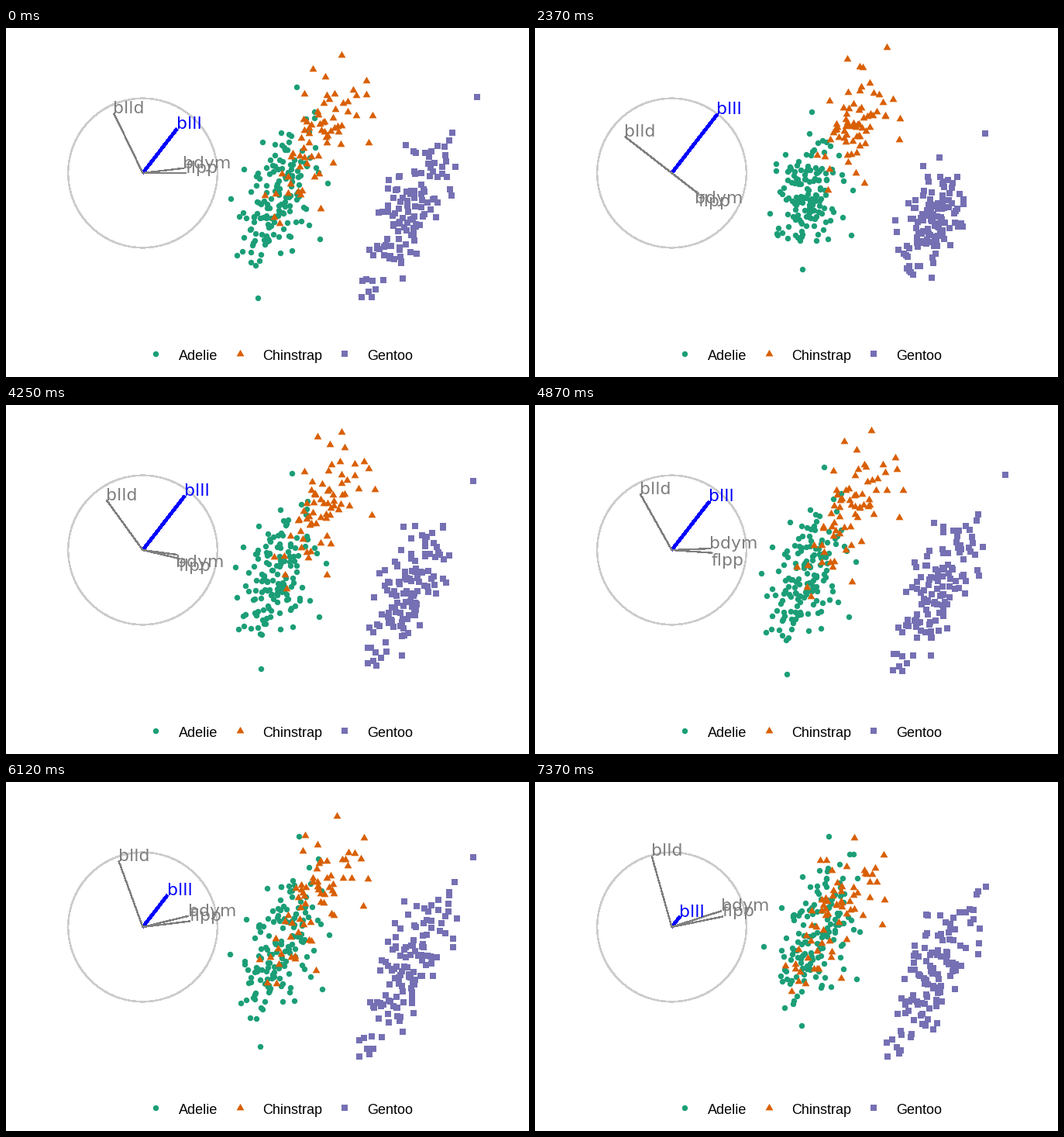
Write a matplotlib script that moves like this. It is 675 by 450 pixels and loops after 8000 ms.

```python
import numpy as np
import matplotlib.pyplot as plt
from matplotlib.animation import FuncAnimation
from matplotlib.patches import Circle

W, H, DPI = 675, 450, 72      # at 72 dpi one point is one pixel
STEP, LOOP = 50, 8000         # ms
TURN_TIME = 625               # ms between two poses

CX, CY, R = 176.5, 187, 96
GREY, BLUE = "#7F7F7F", "#0000FF"

# Standardised bill length, bill depth, flipper length, body mass.
# share: correlation between the measures; edge: a few birds at the rim.
SPREAD = np.array([.55, .56, .47, .56])
SPECIES = [
    dict(name="Adelie", color="#1B9E77", marker="o", size=7.4, key=193,
         n=146, mean=[-.94, .61, -.78, -.62], share=.42,
         edge=[[-2.16, -.84, -.92, -1.44], [.38, 2.2, -.49, 0],
               [-1.1, .73, -2.06, -1.31]]),
    dict(name="Chinstrap", color="#D95F02", marker=(3, 0, 0), size=11.4,
         key=302, n=68, mean=[.9, .64, -.36, -.58], share=.55,
         edge=[[2.58, .33, -1.42, -.63], [1.88, 1.85, .01, .12],
               [-.55, -.28, -.99, -1.25]]),
    dict(name="Gentoo", color="#7570B3", marker="s", size=8, key=437,
         n=119, mean=[.66, -1.1, 1.16, 1.09], share=.62,
         edge=[[2.87, -.08, 2.07, 2.3], [-.19, -2.05, 1, 1],
               [.09, .08, 1.29, 1.31]]),
]


def unit(v):
    return np.array(v, float) / np.linalg.norm(v)


def make_birds(s, rng):
    """A shared size factor plus independent variation per measure."""
    n = s["n"] - len(s["edge"])
    size = rng.standard_normal((n, 1))
    own = rng.standard_normal((n, 4))
    z = np.sqrt(s["share"]) * size + np.sqrt(1 - s["share"]) * own
    z = np.clip(z - z.mean(axis=0), -2, 2)
    return np.vstack([s["mean"] + z * SPREAD, s["edge"]])


# Radial tour: bill length turns out of the plane along a fixed direction
NAMES = ["blll", "blld", "flpp", "bdym"]
ANGLE = np.radians(52.2)
PLANE = np.array([[np.cos(ANGLE), np.sin(ANGLE)],
                  [np.sin(ANGLE), -np.cos(ANGLE)]])
BILL = np.array([1, 0, 0, 0])
OUT = unit([0, .597, .54, .59])
SIDE = unit([0, -.795, .455, .395])


def basis(pose):
    """Bill length swings into the plane by pose 4, then out of it again."""
    degrees = max(0, 41.3 - 11.75 * pose, 11.4 * (pose - 5))
    phi = np.radians(degrees)
    radial = np.cos(phi) * BILL + np.sin(phi) * OUT
    return np.column_stack([radial, SIDE]) @ PLANE


def to_stage(p):
    return 422 + 48.7 * p[:, 0], 209.7 - 67.2 * p[:, 1]


fig = plt.figure(figsize=(W / DPI, H / DPI), dpi=DPI, facecolor="white")
ax = fig.add_axes([0, 0, 1, 1])
ax.set_xlim(0, W)
ax.set_ylim(H, 0)
ax.axis("off")
ax.add_patch(Circle((CX, CY), R + .3, fill=False, ec="#CCCCCC", lw=1.5,
                    antialiased=False))

rng = np.random.default_rng(4)
clouds = []
for s in SPECIES:
    style = dict(ls="none", marker=s["marker"], ms=s["size"], mew=0,
                 color=s["color"], antialiased=False)
    dots, = ax.plot([], [], zorder=3, **style)
    clouds.append((dots, make_birds(s, rng)))
    ax.plot([s["key"]], [420], **style)
    ax.text(s["key"] + 29.5, 428, s["name"], family="Liberation Sans",
            size=18, color="black")

spokes = []
for name in NAMES:
    color, width = (BLUE, 3.5) if name == "blll" else (GREY, 1.3)
    line, = ax.plot([], [], color=color, lw=width, solid_capstyle="butt",
                    antialiased=False)
    label = ax.text(0, 0, name, family="DejaVu Sans", size=22, color=color,
                    zorder=4)
    spokes.append((line, label))


def draw(i):
    b = basis((i * STEP + 150) // TURN_TIME)
    for (line, label), (x, y) in zip(spokes, b):
        tip_x, tip_y = CX + R * x, CY - R * y
        line.set_data([CX, tip_x], [CY, tip_y])
        label.set_position((tip_x - 1, tip_y))
        label.set_va("baseline" if y >= 0 else "top")
    for dots, birds in clouds:
        dots.set_data(*to_stage(birds @ b))
    return []


anim = FuncAnimation(fig, draw, frames=LOOP // STEP, interval=STEP,
                     repeat=True, repeat_delay=0, blit=False)
plt.show()
```
